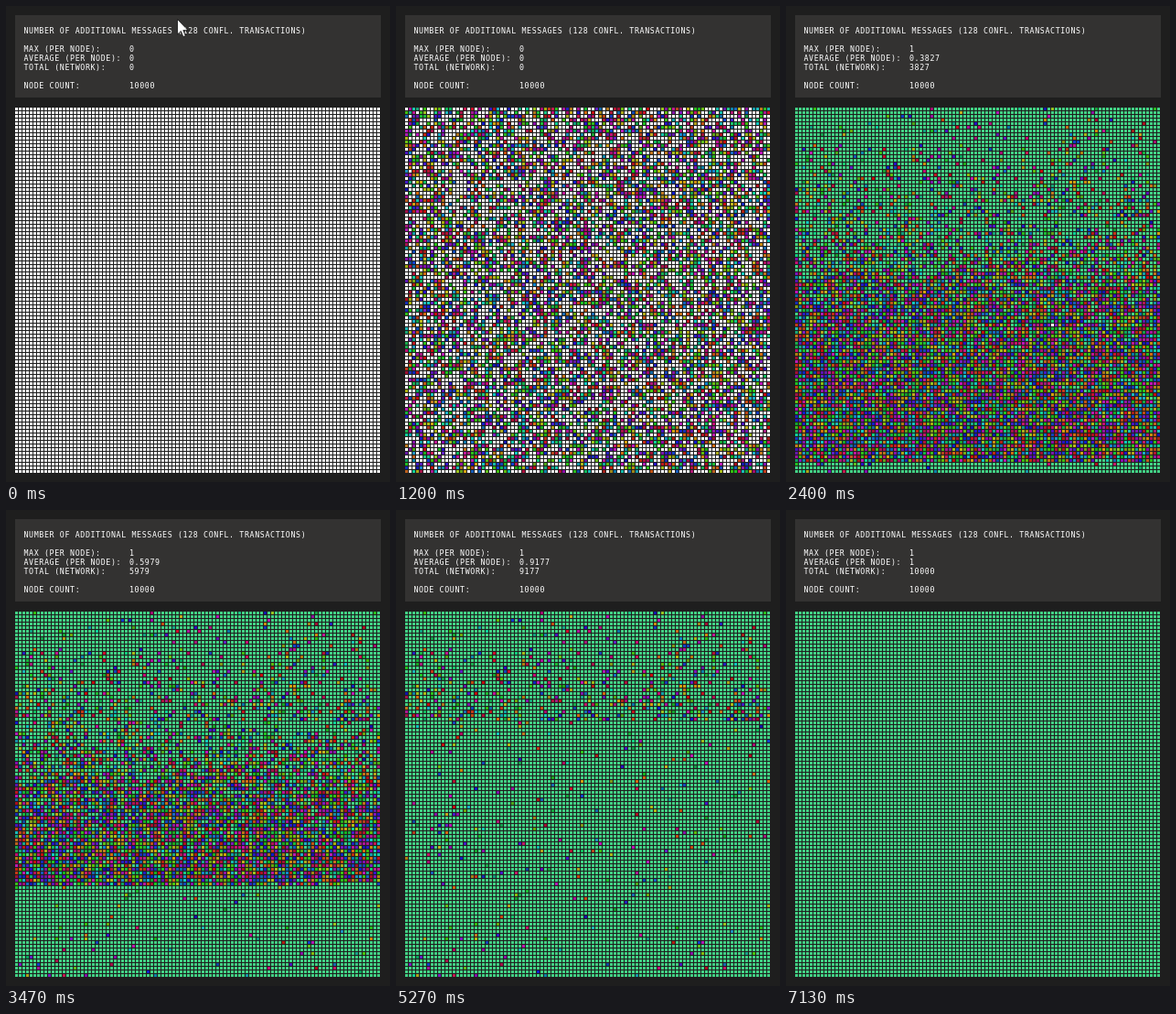
An HTML page with a canvas that plays this animation: 420x520 px, repeating every 8390 ms.

```html
<!DOCTYPE html>
<html lang="en">
<head>
<meta charset="utf-8">
<title>Message spread</title>
<style>
  html, body { margin: 0; width: 100%; height: 100%; overflow: hidden; background: #1e1e1e; }
  .stage { position: relative; width: 420px; height: 520px; overflow: hidden; }
  .panel { position: absolute; left: 10px; top: 10px; width: 400px; height: 90px; background: #333231; }
  pre {
    position: absolute; top: 22px; margin: 0; color: #fff;
    font: 8.3px/10px "DejaVu Sans Mono", monospace; letter-spacing: .62px;
  }
  .labels { left: 19.5px; }
  .values { left: 135px; top: 42px; }
  canvas { position: absolute; left: 10px; top: 111px; }
  .cursor { position: absolute; left: 0; top: 0; }
</style>
</head>
<body>
<div class="stage">
  <div class="panel"></div>
  <pre class="labels">NUMBER OF ADDITIONAL MESSAGES (128 CONFL. TRANSACTIONS)

MAX (PER NODE):
AVERAGE (PER NODE):
TOTAL (NETWORK):

NODE COUNT:</pre>
  <pre class="values"></pre>
  <canvas width="399" height="399"></canvas>
  <svg class="cursor" width="13" height="21">
    <path d="M.5 .5V17L4.3 13.4L6.8 19.6L9.3 18.5L6.8 12.5H12Z" fill="#fff" stroke="#111" stroke-width=".8"/>
  </svg>
</div>
<script>
const LOOP = 8390, SIZE = 100, PITCH = 4, CELL = 3;
const WHITE = '#fff', GREEN = '#42d084';
const ctx = document.querySelector('canvas').getContext('2d');
const values = document.querySelector('.values');
const cursor = document.querySelector('.cursor');

let seed = 7331;
function rnd() {
  seed = (seed + 0x6d2b79f5) | 0;
  let z = Math.imul(seed ^ (seed >>> 15), 1 | seed);
  z = (z + Math.imul(z ^ (z >>> 7), 61 | z)) ^ z;
  return ((z ^ (z >>> 14)) >>> 0) / 4294967296;
}
const logit = u => Math.log((u + 1e-6) / (1 - u + 1e-6));

// Piecewise linear curve through [x, y] points
function curve(points, x) {
  if (x <= points[0][0]) return points[0][1];
  for (let i = 1; i < points.length; i++) {
    const [x0, y0] = points[i - 1], [x1, y1] = points[i];
    if (x <= x1) return y0 + (y1 - y0) * (x - x0) / (x1 - x0);
  }
  return points[points.length - 1][1];
}

const SWEEP = [[29.5, 79], [54, 65.5], [74, 52.5], [95, 40], [97, 36], [100, 35]];
const TOTAL = [[20, 0], [21, 40], [28, 900], [36, 3827], [52, 5979], [65, 7762],
               [79, 9177], [81, 9177], [90, 9720], [98, 9930], [107, 10000]];

const palette = Array.from({ length: 128 }, (_, i) =>
  `hsl(${i * 360 / 128}, ${72 + rnd() * 16}%, ${34 + rnd() * 10}%)`);

// Step at which a node turns green: first wave, upward sweep, or late clean-up
function greenStep(row, index) {
  const upper = row < 29.5;
  const stuck = rnd() < (upper ? .045 + .004 * row : .035);
  const wave = 21 + (row + 8 * logit(rnd()) + 25) * 15 / 65;
  const late = 81 + 26 * (1 - (1 - rnd()) ** .4);
  const jitter = (rnd() - .5) * .6;
  if (stuck) return late;
  if (wave <= 36) return Math.max(21, wave);
  return upper ? late : curve(SWEEP, index / SIZE + jitter);
}

const nodes = Array.from({ length: SIZE * SIZE }, (_, i) => {
  const row = Math.floor(i / SIZE);
  return {
    x: i % SIZE * PITCH,
    y: row * PITCH,
    color: palette[Math.floor(rnd() * palette.length)],
    colored: Math.max(10, 17.8 + 1.6 * logit(rnd())),
    green: greenStep(row, i)
  };
});

function drawNodes(step) {
  ctx.clearRect(0, 0, 399, 399);
  for (const n of nodes) {
    ctx.fillStyle = step >= n.green ? GREEN : step >= n.colored ? n.color : WHITE;
    ctx.fillRect(n.x, n.y, CELL, CELL);
  }
}

function drawText(step) {
  const total = Math.round(curve(TOTAL, step));
  values.textContent = [total ? 1 : 0, total / nodes.length, total, '', nodes.length].join('\n');
}

function drawCursor(step) {
  const k = Math.max(0, (step - 1) / 4);
  cursor.style.display = step < 6 ? '' : 'none';
  cursor.style.transform = `translate(${Math.round(187 - 8 * k)}px, ${Math.round(14 + 285 * k ** 1.5)}px)`;
}

// The picture advances 15 times a second, with short rests between rounds
function stepAt(ms) {
  const step = Math.floor((ms + 4) * .015);
  if (step === 39) return 38;
  if (step === 80 || step === 81) return 79;
  return Math.min(step, 107);
}

let shown = -1;
function frame() {
  const step = stepAt(performance.now() % LOOP);
  if (step !== shown) {
    shown = step;
    drawNodes(step);
    drawText(step);
    drawCursor(step);
  }
  requestAnimationFrame(frame);
}
frame();
</script>
</body>
</html>
```
